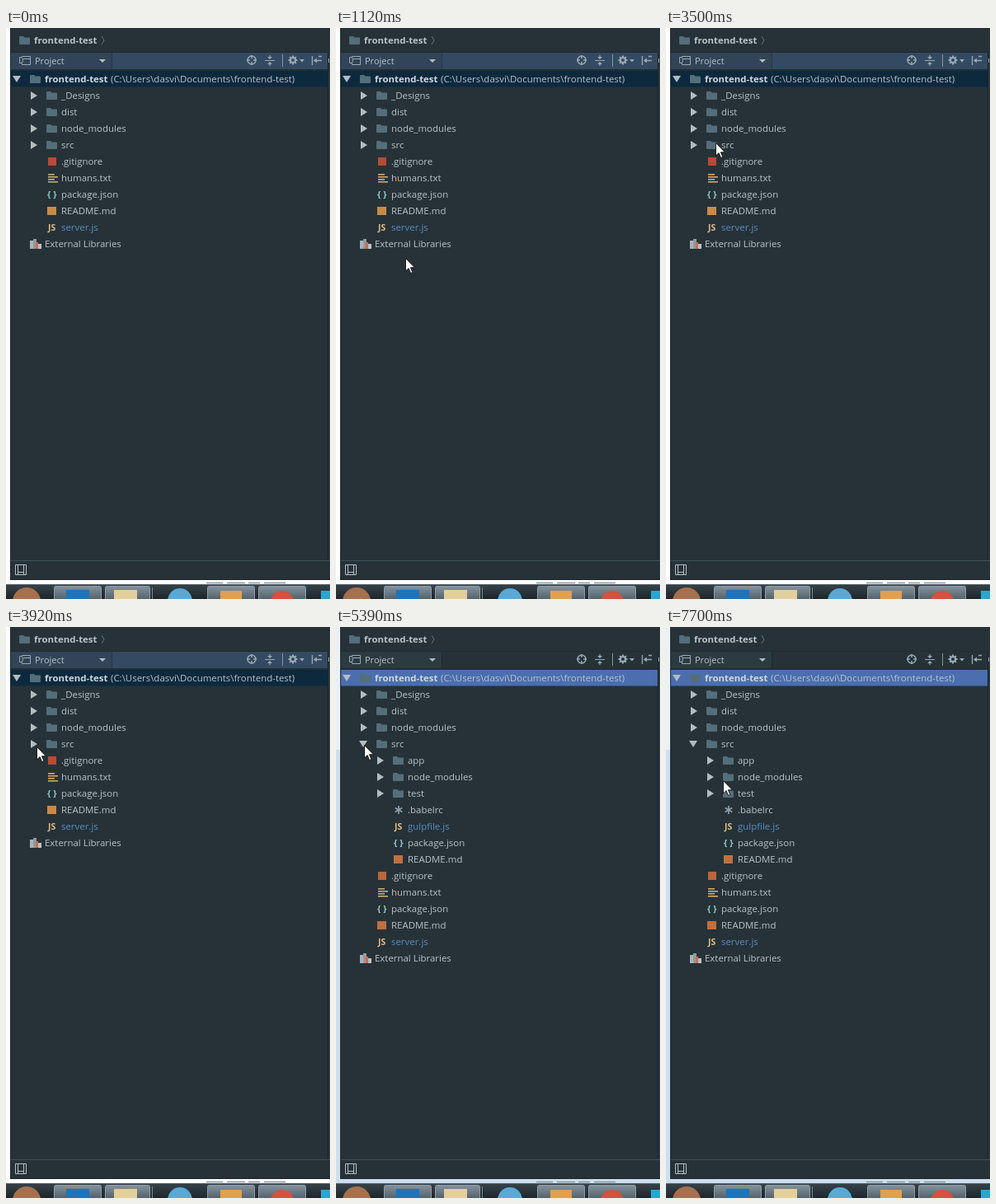
Write an HTML page that moves like this. It is 393 px wide and 693 px high and loops after 8000 ms.

```html
<!DOCTYPE html>
<html lang="en">
<head>
<meta charset="utf-8">
<style>
html, body { margin: 0; width: 100%; height: 100%; overflow: hidden; background: #263238; }
svg { display: block; width: 393px; height: 693px; }
text { font: 11.45px "Open Sans", "Noto Sans", sans-serif; fill: #b7c3c9; white-space: pre; }
.bold { font-weight: 700; }
</style>
</head>
<body>
<svg id="stage" viewBox="0 0 393 693"></svg>
<script>
const LOOP = 8000, STEP = 70, EXPAND_AT = 5390;

const rect = (x, y, w, h, fill, extra = '') =>
  `<rect x="${x}" y="${y}" width="${w}" height="${h}" fill="${fill}" ${extra}/>`;
const circle = (x, y, r, fill) => `<circle cx="${x}" cy="${y}" r="${r}" fill="${fill}"/>`;
const path = (d, fill, extra = '') => `<path d="${d}" fill="${fill}" ${extra}/>`;
const line = (d, color, width = 1) => path(d, 'none', `stroke="${color}" stroke-width="${width}"`);
const text = (x, y, label, extra = '') => `<text x="${x}" y="${y}" ${extra}>${label}</text>`;

// Icons are drawn from their left edge x and vertical centre y.
const icons = {
  folder: (x, y) => path(`M${x} ${y - 4}q0-1 1-1h4l1.5 1.5h5.5q1 0 1 1v6.5q0 1-1 1h-11q-1 0-1-1z`, '#546e7a'),
  git: (x, y, open) => rect(x + 2, y - 5, 10, 10, open ? '#b8663c' : '#b84a35'),
  lines: (x, y) => [8, 12, 8, 12].map((w, i) => rect(x + 2, y - 5 + 3 * i, w, 1.6, '#d8a567')).join(''),
  json: (x, y) => text(x + 1, y + 3.5, '{ }', 'class="bold" style="font-size:11px;fill:#8cc5c3"'),
  markdown: (x, y, open) => rect(x + 1, y - 5, 11, 10, open ? '#c0703f' : '#c98a48'),
  js: (x, y) => text(x + 2, y + 3.5, 'JS', 'class="bold" style="font-size:10.5px;fill:#dfb983"'),
  star: (x, y) => line(`M${x + 7} ${y - 5}v10M${x + 2.7} ${y - 2.5}l8.6 5M${x + 2.7} ${y + 2.5}l8.6-5`, '#8b9da7', 1.7),
  books: (x, y) => rect(x, y - 4, 4, 10, '#a9b3b7') + rect(x + 4, y - 6, 4, 12, '#8f9ba0') +
    rect(x + 7, y - 2, 3, 8, '#d06a4c') + rect(x + 10, y, 4, 6, '#b9c3c7')
};

function arrow(x, y, down) {
  return path(down ? `M${x - 1} ${y - 4}h10l-5 8z` : `M${x + 1} ${y - 5}v10l8-5z`, '#b4bcc0');
}

function row(index, [level, icon, label, toggle], open) {
  const x = 29 + 20 * level, y = 62 + 20 * index;
  const color = icon === 'js' ? 'style="fill:#5b8cc0"' : '';
  return (toggle ? arrow(x - 20, y, toggle === 'down') : '') +
    icons[icon](x, y, open) + text(x + 18, y + 4, label, color);
}

function tree(open) {
  const rows = [
    [1, 'folder', '_Designs', 'right'],
    [1, 'folder', 'dist', 'right'],
    [1, 'folder', 'node_modules', 'right'],
    [1, 'folder', 'src', open ? 'down' : 'right']
  ];
  if (open) rows.push(
    [2, 'folder', 'app', 'right'],
    [2, 'folder', 'node_modules', 'right'],
    [2, 'folder', 'test', 'right'],
    [2, 'star', '.babelrc'],
    [2, 'js', 'gulpfile.js'],
    [2, 'json', 'package.json'],
    [2, 'markdown', 'README.md']
  );
  rows.push(
    [1, 'git', '.gitignore'],
    [1, 'lines', 'humans.txt'],
    [1, 'json', 'package.json'],
    [1, 'markdown', 'README.md'],
    [1, 'js', 'server.js'],
    [0, 'books', 'External Libraries']
  );
  return rect(6, 52, 384, 19.5, open ? '#4b6eaf' : '#0d293e') +
    arrow(9, 62, true) + icons.folder(29, 62) +
    text(47, 66, 'frontend-test', 'class="bold" style="fill:#cfd9de"') +
    text(127, 66, '(C:\\Users\\dasvi\\Documents\\frontend-test)') +
    rows.map((item, i) => row(i + 1, item, open)).join('');
}

function toolbar(open) {
  const ink = '#9aa9b2';
  const teeth = Array.from({ length: 8 }, (_, i) => {
    const a = i * Math.PI / 4, c = Math.cos(a), s = Math.sin(a);
    return `M${348 + 3 * c} ${39 + 3 * s}L${348 + 5.5 * c} ${39 + 5.5 * s}`;
  }).join('');
  return rect(6, 30, 384, 20, open ? '#263238' : '#344a62') +
    rect(6, 30, 122, 20, open ? '#2c3a41' : '#314458') +
    line('M128.5 30v20', open ? '#1e282d' : '#263747') +
    line('M6 29.5h384M6 51h384', '#202b30') +
    line('M19.5 34.5h10v10h-10zM19.5 37.5h10', ink) +
    rect(15, 35, 6, 8, '#31434f') + line('M16.5 35.5h3q2 3.5 0 7h-3z', ink) +
    text(35, 43.5, 'Project', 'style="font-size:11px"') +
    path('M113 38h8l-4 4z', '#b4bcc0') +
    `<circle cx="298" cy="39" r="5" fill="none" stroke="${ink}" stroke-width="1.5"/>` +
    line('M298 33v4M298 41v4M292 39h4M300 39h4', ink, 1.5) +
    line('M314 39.5h12M320 33v4M320 42v4', ink, 1.2) +
    path('M317 35h6l-3 3zM317 44h6l-3-3z', ink) +
    line('M335.5 32v15', '#8997a0') + line(teeth, ink, 2) +
    `<circle cx="348" cy="39" r="3" fill="none" stroke="${ink}" stroke-width="2"/>` +
    path('M356 38h6l-3 3.5z', ink) +
    line('M371.5 34v11M374 39.5h9M379 34.5h4', ink, 1.3) + path('M373 39.5l4-3v6z', ink);
}

function taskbar() {
  const buttons = [[58, 57], [120, 54], [244, 57], [306, 57]];
  return rect(0, 675, 393, 18, 'url(#bar)') + line('M0 675.5h393', '#58636b') +
    circle(25, 696, 17, '#a5704e') +
    buttons.map(([x, w]) => rect(x + .5, 677.5, w, 20, 'url(#button)', 'rx="2" stroke="#8d9ca6"')).join('') +
    line('M177.5 679v14', '#788891') +
    rect(73, 682, 28, 28, '#1b74bd') + rect(131, 682, 28, 28, '#e3cf9c') +
    circle(211, 695, 15, '#58a9d6') + rect(260, 683, 26, 26, '#e2a04c') +
    circle(335, 697, 14, '#d5503f') + rect(382, 683, 16, 16, '#2ba6d0');
}

function scene(open) {
  const edge = open ? '#cddeed' : '#ffffff';
  return rect(0, 0, 393, 693, '#263238') +
    rect(0, 0, 5, 675, edge) + (open ? rect(0, 0, 5, 149, '#e9f1f7') : '') +
    rect(0, 670, 393, 5, edge) +
    line('M243 673.5h20m5 0h22m4 0h14m5 0h26', '#8798a5', 1.5) +
    line('M5.5 0v670', '#1f292e') +
    icons.folder(16, 15) +
    text(34, 19, 'frontend-test', 'class="bold"') + line('M116 10l3 5-3 5', '#60737d') +
    toolbar(open) + tree(open) +
    rect(390, 30, 1, 617, '#1b2428') + rect(391, 30, 2, 617, '#2b363b') +
    line('M391.5 37v5', '#a6b0b5') +
    line('M6 646.5h387', '#40505a') + line('M6 669.5h387', '#1c2529') +
    line('M11.5 651.5h13v12h-13zM14.5 651v13M21.5 651v13M14 660.5h7', '#b4bec3') +
    taskbar();
}

const gradient = (id, top, bottom) =>
  `<linearGradient id="${id}" x2="0" y2="1"><stop stop-color="${top}"/><stop offset="1" stop-color="${bottom}"/></linearGradient>`;

document.getElementById('stage').innerHTML =
  `<defs>${gradient('bar', '#37434b', '#1d262b')}${gradient('button', '#84939d', '#46545d')}</defs>` +
  `<g id="closed">${scene(false)}</g><g id="open">${scene(true)}</g>` +
  `<g id="cursor">${path('M.5 .5V16l3.6-3.4 2.5 5.9 2.3-1-2.5-5.7h5z', '#fff', 'stroke="#111" stroke-width=".9"')}</g>`;

// Pointer path: [time, x, y]
const pointer = [
  [140, 250, 570], [350, 197, 445], [560, 145, 350], [770, 98, 294], [910, 84, 281],
  [1050, 84, 281], [1120, 84, 279], [1400, 81, 225], [1680, 74, 163], [1890, 70, 141],
  [1960, 68, 139], [3430, 68, 139], [3500, 60, 139], [3710, 46, 140], [3990, 34, 146],
  [4130, 34, 146], [4200, 34, 144], [4410, 34, 144], [4480, 46, 135], [4620, 34, 143],
  [6790, 34, 143], [6860, 43, 146], [7070, 75, 155], [7210, 75, 155], [7700, 69, 186]
];

function pointerAt(t) {
  const next = pointer.findIndex(key => key[0] > t);
  if (next < 0) return pointer[pointer.length - 1].slice(1);
  const [t0, x0, y0] = pointer[next - 1], [t1, x1, y1] = pointer[next];
  const k = (t - t0) / (t1 - t0);
  return [Math.round(x0 + (x1 - x0) * k), Math.round(y0 + (y1 - y0) * k)];
}

const [closedView, openView, cursor] = ['closed', 'open', 'cursor'].map(id => document.getElementById(id));
const show = (node, on) => node.setAttribute('visibility', on ? 'visible' : 'hidden');

function draw(now) {
  const t = Math.floor(now % LOOP / STEP) * STEP;
  show(closedView, t < EXPAND_AT);
  show(openView, t >= EXPAND_AT);
  show(cursor, t >= pointer[0][0]);
  if (t >= pointer[0][0]) cursor.setAttribute('transform', `translate(${pointerAt(t)})`);
  requestAnimationFrame(draw);
}
draw(performance.now());
</script>
</body>
</html>
```
